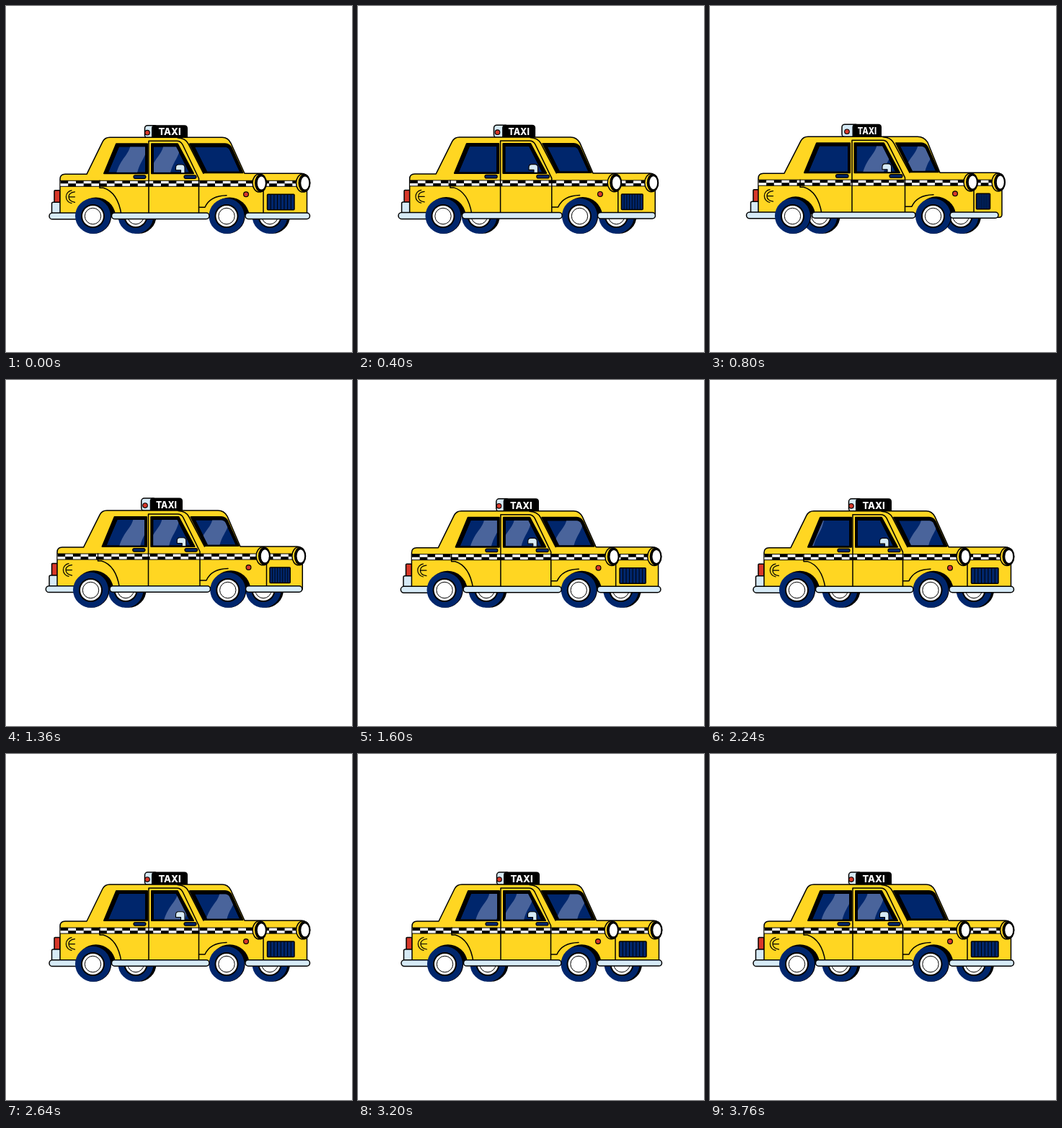
Recreate the animation shown at these times as an HTML page. Size 480x480 px, loop 3840 ms.

```html
<!DOCTYPE html>
<html lang="en">
<head>
<meta charset="utf-8">
<title>Taxi</title>
<style>
html, body { margin: 0; width: 100%; height: 100%; overflow: hidden; background: #fff; }
svg { display: block; width: 100vw; height: 100vh; }
text { font: 800 13px Inter, "Open Sans", sans-serif; }
</style>
</head>
<body>
<svg id="stage" viewBox="0 0 480 480"></svg>
<script>
const LOOP = 3840;
const YELLOW = '#ffd622', NAVY = '#00266c', SHINE = '#4a649b', PALE = '#d6eaf6', RED = '#d8382a', INK = '#000';
const stage = document.getElementById('stage');

// Glare positions per window: [time, x]
const GLARE = {
  rear: [[0, 174], [600, 108], [601, 234], [800, 230], [1360, 181], [1920, 172], [2520, 104], [2521, 236], [2640, 230], [3200, 184], [3840, 174]],
  door: [[0, 220], [400, 165], [401, 288], [800, 239], [1360, 221], [1920, 216], [2300, 165], [2301, 288], [2640, 240], [3200, 222], [3840, 220]],
  screen: [[0, 370], [400, 360], [800, 296], [1360, 291], [1920, 292], [2640, 298], [3200, 296], [3640, 226], [3641, 370], [3840, 370]]
};

let k = 0;                                   // 0 = turned right, 1 = turned left
const mix = (a, b) => +(a + (b - a) * k).toFixed(2);
const smooth = x => { x = Math.min(1, Math.max(0, x)); return x * x * (3 - 2 * x); };
const turn = t => smooth((t - 80) / 720) - smooth((t - 1000) / 720);

function track(keys, t) {
  let i = 1;
  while (keys[i][0] < t) i++;
  const [t0, a] = keys[i - 1], [t1, b] = keys[i];
  return a + (b - a) * (t - t0) / (t1 - t0);
}

const path = (d, fill = 'none', w = 1.5) =>
  `<path d="${d}" fill="${fill}" stroke="${INK}" stroke-width="${w}" stroke-linejoin="round" stroke-linecap="round"/>`;
const box = (x0, x1, y, h, r, fill, w = 1.5) =>
  `<rect x="${x0}" y="${y}" width="${x1 - x0}" height="${h}" rx="${r}" fill="${fill}" stroke="${INK}" stroke-width="${w}"/>`;
const oval = (x, y, rx, ry, fill, w = 0) =>
  `<ellipse cx="${x}" cy="${y}" rx="${rx}" ry="${ry}" fill="${fill}" stroke="${INK}" stroke-width="${w}"/>`;

function wheel(x, depth) {
  return oval(x + depth, 291.3, 24.5, 24.5, INK) + oval(x, 291.3, 24.5, 24.5, NAVY) +
    oval(x, 291.5, 16.5, 16.5, INK) + oval(x, 291.5, 14.5, 14.5, '#fff') + oval(x, 291.5, 11.2, 11.2, 'none', 1);
}

// Dark wheel housing, cut off at the sill
const well = x => `<path d="M${x - 23} 288A27.500 27.500 0 0 1 ${x + 31.5} 288Z"/>`;

function glass(id, frame, pane, t) {
  const x = track(GLARE[id], t) - 6 * k;
  return path(`M${frame}Z`, INK, 2) +
    `<clipPath id="${id}"><path d="M${pane}Z"/></clipPath><g clip-path="url(#${id})">` +
    `<path d="M${pane}Z" fill="${NAVY}"/>` +
    `<path d="M${x - 1} 190C${x - 3} 206 ${x - 14} 208 ${x - 21} 231H${x + 8}C${x + 12} 213 ${x + 20} 211 ${x + 23} 190Z" fill="${SHINE}"/></g>`;
}

function checks(x0, x1, y) {
  const n = 31, w = (x1 - x0) / n;
  let d = '';
  for (let i = 0; i < n; i++)
    d += `M${(x0 + i * w).toFixed(2)} ${y + (i % 2) * 4}h${w.toFixed(2)}v4h${(-w).toFixed(2)}z`;
  return `<rect x="${x0}" y="${y}" width="${x1 - x0}" height="8" fill="#fff"/><path d="${d}"/>` +
    path(`M${x0} ${y}H${x1}M${x0} ${y + 8}H${x1}`, 'none', 1);
}

function lamp(x, w) {
  return oval(x - 2, 244.3, w, 12.5, YELLOW, 1.5) + oval(x, 244.3, w - 1, 12.5, INK) +
    oval(x + .8, 244.3, w - 4, 9, '#fff');
}

function sign() {
  const left = mix(192.5, 183), face = mix(202, 197.5), right = mix(252, 238);
  return box(left, face + 8, 164, 17.5, 4, PALE) +
    `<path d="M${face} 181.500V168q0-4.500 4.500-4.500H${right - 4.5}q4.500 0 4.500 4.500V181.500Z"/>` +
    oval(mix(196, 190), 174, 3.3, 3.3, RED, 1.1) +
    `<text transform="translate(${mix(227, 218)} 177.800) scale(${mix(1, .85)} 1)" text-anchor="middle" fill="#fff">TAXI</text>`;
}

function shell() {
  const back = mix(75, 67), nose = mix(417.5, 405);
  return path(`M${back} 288V239Q${back} 232 ${back + 7} 232H${mix(112, 103)}L${mix(134, 126)} 187` +
    `Q${mix(137, 129)} 181 ${mix(144, 136)} 181H${mix(300, 288)}Q${mix(308, 297)} 181 ${mix(312, 302)} 189` +
    `L${mix(331, 319)} 231H${nose - 8}Q${nose} 231 ${nose} 240V${mix(288, 289)}q0 4 -4 4H${nose - 10}V288Z`, YELLOW);
}

function seams() {
  const front = mix(267.5, 270.5), post = mix(198, 197), arch = mix(130, 125);
  return path(`M${post} 288V186H${mix(237, 239)}Q${mix(242, 245)} 186 ${mix(245, 247)} 191L${front} 238V288`) +
    path(`M${mix(238, 240)} 181.500Q${mix(249, 251)} 182 ${mix(253, 255)} 190L${mix(274, 277)} 231`) +
    path(`M${arch} 241V251H${arch + 5}Q${arch + 25} 257 ${arch + 30} 288`) +
    path(`M${front} 278H${mix(276, 280)}Q${mix(283, 287)} 262 ${mix(306, 310)} 261.500`) +
    path(`M${mix(357, 366)} 250V288`);
}

function emblem(x) {
  return path(`M${x + 3} 254.500A9 9 0 0 0 ${x + 3} 272.300M${x + 7.5} 256.500Q${x - 1} 257.500 ${x - 1} 263.500` +
    `Q${x - 1} 269.500 ${x + 7.5} 271M${x - 1} 263.500H${x + 7.5}`, 'none', 1.2);
}

function grille() {
  const a = mix(362.5, 369.5), b = mix(400, 388.5), n = 8;
  let bars = '';
  for (let i = 1; i < n; i++) bars += `M${(a + (b - a) * i / n).toFixed(2)} 260.500V281`;
  return box(a, b, 260, 21.5, 1, NAVY, 1.5) + path(bars, 'none', mix(1, .6));
}

const mirror = x =>
  path(`M${x} 226.500V223Q${x} 218.700 ${x + 4} 218.700H${x + 8.5}Q${x + 12.5} 218.700 ${x + 12.5} 223V230.500H${x + 7}V226.500Z`, PALE, 1.1);

function windows(t) {
  const r = mix(196, 194), d = mix(202, 200.5);
  return glass('rear', `${mix(153, 148)} 190H${r}V231H${mix(136, 131)}`,
      `${mix(157, 152)} 194H${r - 3}V229.500H${mix(142, 137)}`, t) +
    glass('door', `${d} 190H${mix(238, 241)}L${mix(260, 263)} 231H${d}`,
      `${d + 3} 194H${mix(236, 239)}L${mix(254, 257)} 229.500H${d + 3}`, t) +
    glass('screen', `${mix(255, 258)} 190H${mix(304, 293)}Q${mix(310, 299)} 190 ${mix(313, 302)} 196L${mix(328.5, 317)} 230H${mix(275, 278)}`,
      `${mix(262, 264)} 194.500H${mix(304, 293)}Q${mix(308, 297)} 194.500 ${mix(310, 299)} 198L${mix(324, 313)} 228.500H${mix(279, 281)}`, t);
}

function draw(t) {
  k = turn(t);
  const bob = .65 * (1 + Math.cos(2 * Math.PI * 21 * t / LOOP));
  const lift = (s, m) => `<g transform="translate(0 ${(bob * s).toFixed(3)})">${m}</g>`;
  const tail = mix(67, 60), rear = mix(120.5, 114.5), fore = mix(306, 309.5);
  stage.innerHTML =
    wheel(mix(180, 152), 4) + wheel(mix(366, 348), 3.5) +
    lift(1.3, sign()) +
    lift(1, box(tail, tail + 8, 254.5, 17, 1, RED) + box(tail - 3.5, tail + 9, 271, 16, 2, PALE) +
      shell() + checks(mix(75.5, 67.5), mix(408, 397), 241) + seams() + windows(t) +
      box(mix(177, 174.5), mix(194, 192), 233.5, 4.5, 2.2, NAVY, 1.2) +
      box(mix(247, 249), mix(264, 267), 233.5, 4.5, 2.2, NAVY, 1.2) +
      mirror(mix(235.5, 239)) + emblem(mix(88, 80)) + oval(mix(333, 340), 260, 3.4, 3.4, RED, 1.2) +
      grille() + lamp(mix(353.5, 363.5), 9.5) + lamp(mix(414, 402), mix(9.5, 9)) +
      box(mix(60, 50.5), mix(102, 96), 285.7, 8.8, 4.4, PALE) + well(rear) + well(fore)) +
    wheel(rear, 1.2) + wheel(fore, 1.2) +
    lift(1, box(mix(146.5, 141.5), mix(282, 285), 285.7, 8.4, 4.2, PALE) +
      box(mix(332, 333), mix(421.5, 400), 285.7, 8.4, 4.2, PALE));
}

function tick() {
  draw(performance.now() % LOOP);
  requestAnimationFrame(tick);
}
tick();
</script>
</body>
</html>
```
